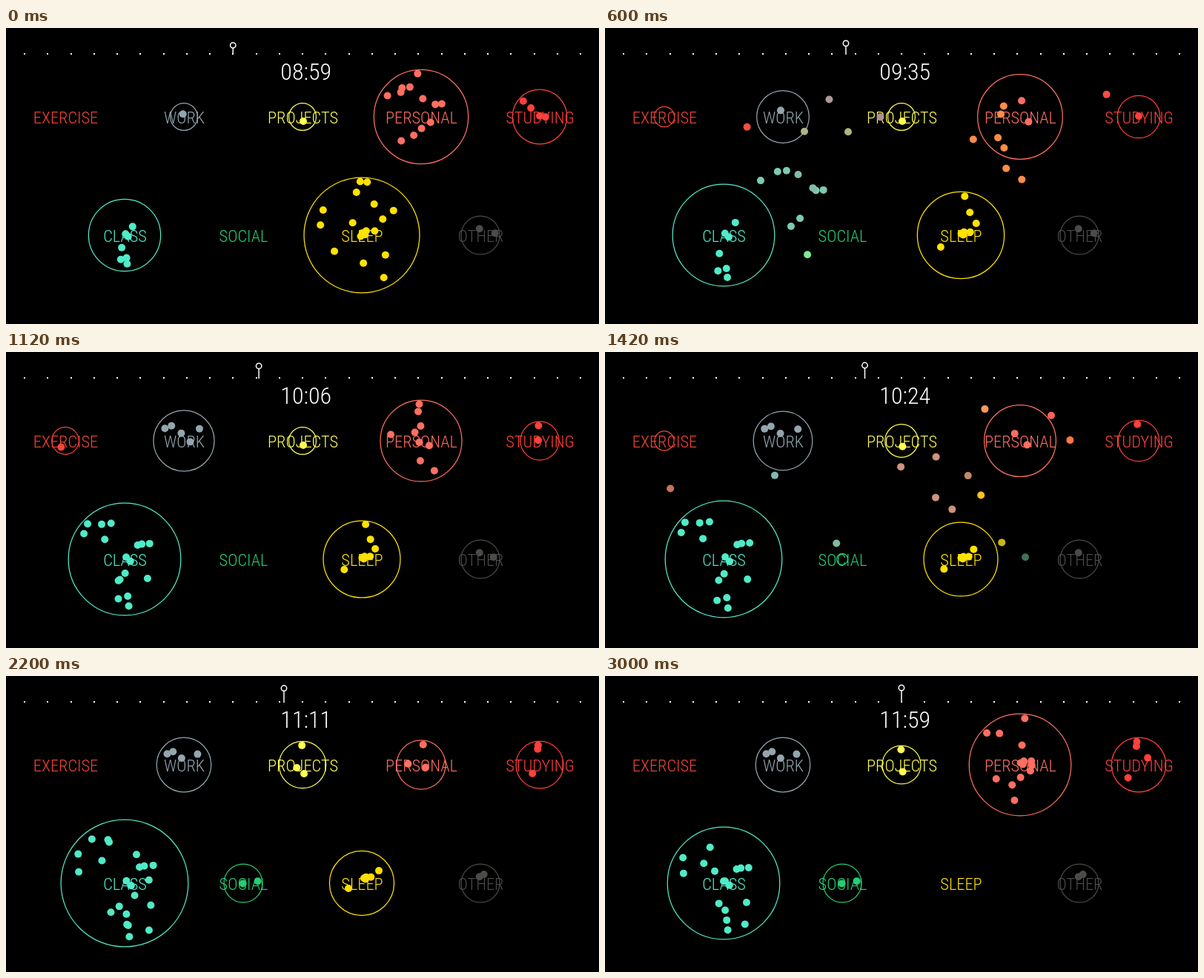
An HTML page with a canvas for the animation above (3020 ms loop, 800 by 400 pixels).

```html
<!DOCTYPE html>
<html lang="en">
<head>
<meta charset="utf-8">
<title>A morning of activities</title>
<style>
  html, body { margin: 0; width: 100%; height: 100%; overflow: hidden; background: #000; }
  canvas { display: block; }
</style>
</head>
<body>
<canvas id="stage" width="800" height="400"></canvas>
<script>
const ctx = document.getElementById("stage").getContext("2d");
const LOOP = 3020, STEP = 20;
const START = 539;            // 08:59 in minutes
const PER_STEP = 1.2;         // clock minutes per step
const HOURS = 3;
const UNIT = 18.38;           // ring radius for one dot; area grows with the count
const DOT = 5;
const PAD = 5.5;
const FAMILY = '"Roboto Condensed", Roboto, sans-serif';

const group = (label, col, row, rgb) => ({ label, x: 80 + 160 * col, y: 120 + 160 * row, rgb });
const groups = {
  E: group("EXERCISE", 0, 0, [244, 67, 54]),
  W: group("WORK", 1, 0, [147, 166, 174]),
  J: group("PROJECTS", 2, 0, [255, 255, 82]),
  P: group("PERSONAL", 3, 0, [255, 111, 97]),
  S: group("STUDYING", 4, 0, [255, 64, 60]),
  C: group("CLASS", 0.5, 1, [80, 235, 200]),
  O: group("SOCIAL", 1.5, 1, [38, 206, 115]),
  L: group("SLEEP", 2.5, 1, [255, 226, 0]),
  X: group("OTHER", 3.5, 1, [76, 75, 73])
};

// Group at each hour, then the place within the ring in percent
const people = [
  ["LPJJ", -3, -100], ["LLPP", 10, -99], ["LPSS", -10, -80], ["LLXX", 23, -58],
  ["LWWW", 59, -46], ["LLLS", 39, -30], ["LPPC", -17, -23], ["LWWW", -72, -47],
  ["LPCC", -77, -19], ["LLLP", -51, 30], ["LPCC", 3, 52], ["LCCC", 44, 37],
  ["LPCC", 41, 79], ["LLLP", 8, -8], ["LLLP", 24, -8], ["LLLP", 1, -4],
  ["LPOO", -2, 2], ["LLLP", 6, -1],
  ["PSSS", -8, -100], ["PCCC", -78, -49], ["PCCP", -44, -67], ["PCCC", -26, -69],
  ["PWWW", -47, -57], ["PPCP", 4, -42], ["PCCC", 33, -29], ["PCCC", 48, -30],
  ["PPPP", 22, 13], ["PCCP", 1, 27], ["PCSP", -17, 43], ["PECS", -46, 56],
  ["SCCP", -71, -68], ["SCCC", -38, -38], ["SSJC", 0, -4], ["SWCP", 25, 1],
  ["CCCC", 25, -27], ["CCCC", 3, -4], ["CCCC", 11, 4], ["CCCC", -9, 39],
  ["CCCP", -12, 76], ["CCCC", 6, 71], ["CCCC", 8, 90],
  ["WWWW", -10, -29], ["JJJJ", 8, 46], ["XXXX", -6, -43], ["XXOO", 96, -13]
].map(([path, x, y]) => ({ path, x: x / 100, y: y / 100 }));

for (const key in groups) {
  groups[key].radii = Array.from({ length: HOURS + 1 }, (_, h) =>
    UNIT * Math.sqrt(people.filter(p => p.path[h] === key).length));
}

const mix = (a, b, k) => a + (b - a) * k;
const css = c => `rgb(${c.map(Math.round).join(",")})`;
const ease = p => p < 0.5 ? 4 * p ** 3 : 1 - 4 * (1 - p) ** 3;
const two = n => String(Math.floor(n)).padStart(2, "0");

function write(text, x, y, size, color) {
  ctx.font = `300 condensed ${size}px ${FAMILY}`;
  ctx.textAlign = "center";
  ctx.fillStyle = color;
  ctx.fillText(text, x, y);
}

function ring(x, y, r, color, width) {
  ctx.strokeStyle = color;
  ctx.lineWidth = width;
  ctx.beginPath();
  ctx.arc(x, y, r, 0, 2 * Math.PI);
  ctx.stroke();
}

function place(p, h) {
  const g = groups[p.path[h]], reach = g.radii[h] - PAD;
  return { x: g.x + p.x * reach, y: g.y + p.y * reach, rgb: g.rgb };
}

function drawTimeline(minutes) {
  const hours = minutes / 60, x = 25.5 + 31.25 * hours;
  const y = 16 + 0.81 * (12 - hours) ** 2;
  ctx.fillStyle = "#fff";
  for (let i = 0; i <= 24; i++) ctx.fillRect(Math.round(24 + 31.25 * i), 34, 2, 2);
  ring(x, y, 3.7, "#fff", 1.5);
  ctx.beginPath();
  ctx.moveTo(x, y + 3.7);
  ctx.lineTo(x, 36);
  ctx.stroke();
  write(two(hours) + ":" + two(minutes % 60), 404.7, 70, 32, "#fff");
}

function draw(t) {
  // Everything follows the whole minutes of the clock
  const step = Math.floor(t / STEP + 0.25);
  const passed = Math.min(60 * HOURS, Math.floor(step * PER_STEP + 0.001));
  const h = Math.min(HOURS - 1, Math.floor(passed / 60));
  const k = ease(passed / 60 - h);

  ctx.fillStyle = "#000";
  ctx.fillRect(0, 0, 800, 400);
  drawTimeline(START + passed);

  for (const g of Object.values(groups)) {
    const r = mix(g.radii[h], g.radii[h + 1], k), color = css(g.rgb);
    if (r > 0.3) ring(g.x, g.y, r, color, 1.25);
    write(g.label, g.x + 0.5, g.y + 9, 22.4, color);
  }

  for (const p of people) {
    const a = place(p, h), b = place(p, h + 1);
    ctx.fillStyle = css(a.rgb.map((v, i) => mix(v, b.rgb[i], k)));
    ctx.beginPath();
    ctx.arc(mix(a.x, b.x, k), mix(a.y, b.y, k), DOT, 0, 2 * Math.PI);
    ctx.fill();
  }
}

const start = performance.now();
function tick() {
  draw((performance.now() - start) % LOOP);
  requestAnimationFrame(tick);
}
tick();
</script>
</body>
</html>
```
